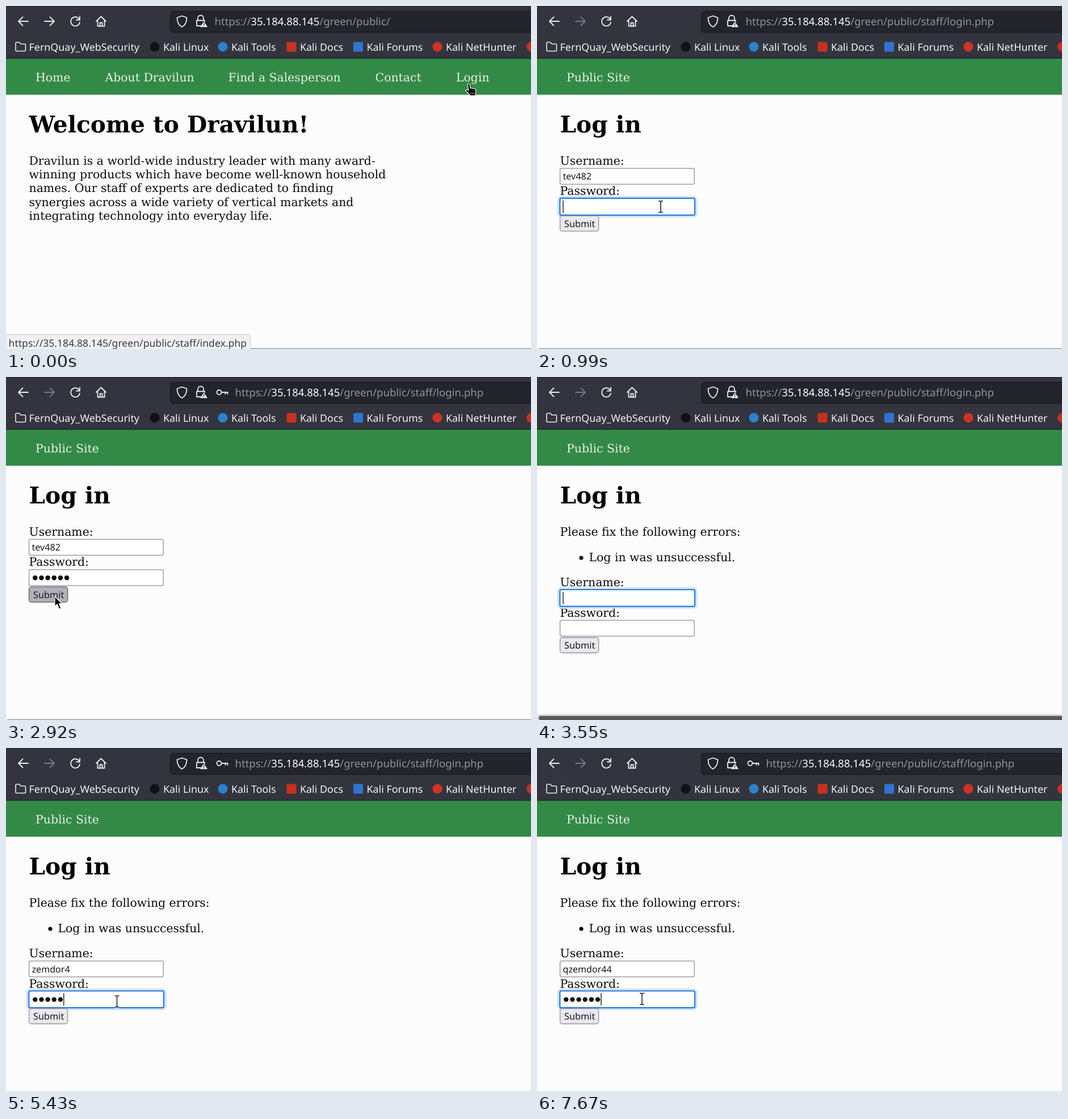
Write an HTML page that moves like this. It is 925x605 px and loops after 8000 ms.

```html
<!DOCTYPE html>
<html lang="en">
<head>
<meta charset="utf-8">
<title>Login demo</title>
<style>
  html, body { margin: 0; width: 100%; height: 100%; overflow: hidden; background: #fcfcfc; }
  svg { display: block; width: 100vw; height: 100vh; }
  text { white-space: pre; text-rendering: geometricPrecision; }
  .page { font: 20.43px "DejaVu Serif", serif; fill: #0a0a0a; }
  .title { font-size: 40.65px; font-weight: bold; fill: #000; }
  .nav { fill: #ebeee8; }
  .ui { font: 17.9px "Noto Sans", sans-serif; fill: #f4f4f8; }
  .url { font-size: 18.55px; fill: #92929a; }
  .host { fill: #fbfbfe; font-weight: 500; }
  .control { font: 16.1px "Noto Sans", sans-serif; fill: #18181c; }
  .line { fill: none; stroke: #ededf2; stroke-width: 1.8; stroke-linecap: round; stroke-linejoin: round; }
  .box { fill: #fff; stroke: #8f8f9d; stroke-width: 1.3; }
  .pointer { fill: #000; stroke: #fff; stroke-width: 1.2; stroke-linejoin: round; }
</style>
</head>
<body>
<svg viewBox="0 0 925 605" preserveAspectRatio="none">
  <rect width="925" height="605" fill="#fcfcfc"/>

  <g id="toolbar">
    <rect width="925" height="93" fill="#33343d"/>
    <rect width="925" height="1" fill="#1d1d24"/>
    <rect y="91.5" width="925" height="1.5" fill="#25262c"/>
    <rect x="289.5" y="9.5" width="660" height="37" rx="5" fill="#24242d" stroke="#19191e" stroke-width="1.3"/>
    <g class="line">
      <path d="M39 27H22M29.5 19.5L22 27L29.5 34.5"/>
      <path id="forward" d="M68 27H85M77.5 19.5L85 27L77.5 34.5"/>
      <path d="M129.5 24A8 8 0 1 0 130 29M130 18.5V24.5H124"/>
      <path d="M159 27L167.5 18.5L176 27M161.5 25.5V35.5H173.5V25.5M165.5 35V29.5H169.5V35"/>
      <path d="M310 17.5L318.5 20.5C318.5 29 315.5 34 310 37C304.5 34 301.5 29 301.5 20.5Z"/>
      <path d="M338 25V21.5A5 5 0 0 1 348 21.5V25M343 35H336V25.5H350V27"/>
      <path d="M348.5 28.5L354 36.5H343Z" fill="#ededf2" stroke-width="1.3"/>
      <path d="M348.5 31V33.4M348.5 35.2V35.3" stroke="#24242d" stroke-width="1.3"/>
      <g id="key">
        <circle cx="375.5" cy="27" r="4"/>
        <path d="M380 27H390.5V30M386.5 27V30"/>
      </g>
      <path d="M17 78V65.5Q17 64 18.5 64H23.5L26 67H33Q34.5 67 34.5 68.5V78Q34.5 79.5 33 79.5H18.5Q17 79.5 17 78Z" stroke-width="1.6"/>
    </g>
    <text id="url" class="ui url" y="33.5"><tspan>https://</tspan><tspan class="host">35.184.88.145</tspan><tspan id="path"></tspan></text>
    <g id="bookmarks" class="ui"></g>
  </g>

  <rect y="93" width="925" height="63.5" fill="#338a46"/>

  <g id="home" class="page"></g>

  <g id="login" class="page">
    <text class="nav" x="52" y="133">Public Site</text>
    <text class="title" x="40.5" y="223">Log in</text>
    <g id="errors">
      <text x="40.5" y="280">Please fix the following errors:</text>
      <circle cx="78" cy="319" r="3.6"/>
      <text x="91.5" y="324.5">Log in was unsuccessful.</text>
    </g>
    <g id="form">
      <text x="40.5" y="280">Username:</text>
      <rect class="box" x="40.6" y="286.3" width="236.6" height="28" rx="2.5"/>
      <text x="40.5" y="333.3">Password:</text>
      <rect class="box" x="40.6" y="339.8" width="236.6" height="28" rx="2.5"/>
      <g id="focus">
        <rect x="37.5" y="337" width="243" height="34" rx="5" fill="none" stroke="#cfe4fb" stroke-width="4"/>
        <rect x="40.3" y="339.2" width="237.7" height="29.6" rx="2.5" fill="#fff" stroke="#2579df" stroke-width="2.2"/>
      </g>
      <text id="user" class="control" x="45.5" y="306.3"></text>
      <g id="dots"></g>
      <rect id="caret" y="343" width="1.3" height="22"/>
      <rect id="button" x="40.6" y="370.2" width="68" height="27" rx="4" stroke-width="1.3"/>
      <text class="control" x="48" y="389.8" style="font-size:16.3px">Submit</text>
    </g>
  </g>

  <g id="wideBar">
    <rect y="594.5" width="925" height="11" fill="#dedee0"/>
    <rect x="3" y="597.8" width="940" height="7.4" rx="3.7" fill="#58585c"/>
  </g>
  <rect id="thinBar" x="2.5" y="603.7" width="925" height="1.3" fill="#929295"/>

  <g id="status">
    <path d="M-1 579.5H426Q430.5 579.5 430.5 584V606H-1Z" fill="#f1f1f3" stroke="#c9c9ce"/>
    <text class="ui" x="4.5" y="601" style="font-size:17.63px;fill:#3b3b42">https://35.184.88.145/green/public/staff/index.php</text>
  </g>

  <g id="hand" class="pointer">
    <path d="M-3.5 1.5Q-3.5 -.5 -1.8 -.5Q0 -.5 .3 1.5L1 7L8 8.5Q11.5 9.5 11 13L10 20.5H.5Q-1 17 -5 14Q-8 11.5 -6.3 10.2Q-4.5 9.2 -2.2 11.5Z"/>
    <path d="M2 15V18M5 15V18M8 15V18" stroke-width=".8"/>
  </g>
  <g id="beam">
    <path d="M-4 -10H-1.5L0 -9L1.5 -10H4M0 -9V9M-4 10H-1.5L0 9L1.5 10H4" fill="none" stroke="#fff" stroke-width="3.6"/>
    <path d="M-4 -10H-1.5L0 -9L1.5 -10H4M0 -9V9M-4 10H-1.5L0 9L1.5 10H4" fill="none" stroke="#222" stroke-width="1.6"/>
  </g>
  <path id="arrow" class="pointer" d="M0 0V17.5L4.2 13.8L7.5 22.3L10.8 20.8L7.3 12.8H12.5Z"/>
</svg>

<script>
const LOOP = 8000;
const FORM_SHIFT = 89.3, FIELD_GAP = 53.5, DOT_STEP = 11.15;
const NS = "http://www.w3.org/2000/svg";
const $ = id => document.getElementById(id);

function add(parent, tag, attrs, content = "") {
  const node = document.createElementNS(NS, tag);
  for (const name in attrs) node.setAttribute(name, attrs[name]);
  node.textContent = content;
  parent.append(node);
  return node;
}
const show = (id, on) => { $(id).style.display = on ? "" : "none"; };
const move = (id, x, y) => $(id).setAttribute("transform", `translate(${x} ${y})`);

// Bookmark labels with plain coloured marks.
[["FernQuay_WebSecurity", 40.5], ["Kali Linux", 277, "#111216"], ["Kali Tools", 397, "#2b82cf"],
 ["Kali Docs", 518, "#c7321f", true], ["Kali Forums", 635.5, "#2f74d0", true],
 ["Kali NetHunter", 775, "#cf3423"], ["", 940.5, "#c5311f"]].forEach(([label, x, color, square]) => {
  add($("bookmarks"), "text", { x, y: 78.5 }, label);
  if (color) add($("bookmarks"), "rect",
    { x: x - 23.5, y: 63.5, width: 17, height: 17, rx: square ? 1.5 : 8.5, fill: color });
});

// Public start page.
[["Home", 52], ["About Dravilun", 174.5], ["Find a Salesperson", 391.5], ["Contact", 650.5], ["Login", 793]]
  .forEach(([label, x]) => add($("home"), "text", { class: "nav", x, y: 133 }, label));
add($("home"), "text", { class: "title", x: 40.5, y: 223 }, "Welcome to Dravilun!");
["Dravilun is a world-wide industry leader with many award-",
 "winning products which have become well-known household",
 "names. Our staff of experts are dedicated to finding",
 "synergies across a wide variety of vertical markets and",
 "integrating technology into everyday life."]
  .forEach((line, i) => add($("home"), "text", { x: 40.5, y: 280 + i * 24.2 }, line));

const dots = Array.from({ length: 6 }, (_, i) =>
  add($("dots"), "circle", { cx: 51.3 + i * DOT_STEP, cy: 354.3, r: 4.2 }));

// Each step changes part of the state from its time (ms) on.
const steps = [
  [0, { page: "home", user: "", dots: 0, focus: "", bar: "thin", pointer: ["hand", 817, 137.5] }],
  [120, { page: "login", focus: "user", pointer: null }],
  [500, { user: "te", bar: "wide" }],
  [620, { user: "tev48" }],
  [990, { user: "tev482", focus: "pass", bar: "thin", pointer: ["beam", 218, 354] }],
  [1870, { dots: 1, bar: "" }],
  [2130, { dots: 4 }],
  [2260, { dots: 6 }],
  [2780, { bar: "thin", pointer: ["arrow", 86, 387] }],
  [2920, { focus: "", pressed: true }],
  [3040, { page: "error", user: "", dots: 0, pressed: false }],
  [3180, { focus: "user", bar: "wide" }],
  [3430, { pointer: null }],
  [3790, { user: "ze", bar: "thin" }],
  [3915, { user: "zemd" }],
  [4040, { user: "zemdor4", bar: "" }],
  [4680, { focus: "pass", pointer: ["beam", 195.5, 447] }],
  [4780, { dots: 1 }],
  [5060, { dots: 3 }],
  [5430, { dots: 5 }],
  [5680, { dots: 6 }],
  [5805, { bar: "thin", pointer: ["arrow", 90, 473] }],
  [5930, { focus: "", pressed: true }],
  [6055, { user: "", dots: 0, pressed: false }],
  [6180, { bar: "wide" }],
  [6305, { pointer: null }],
  [6680, { user: "q", focus: "user", bar: "thin" }],
  [6800, { user: "qze" }],
  [7050, { user: "qzemd", bar: "" }],
  [7170, { user: "qzemdor44" }],
  [7310, { focus: "pass", dots: 1, bar: "thin", pointer: ["beam", 185, 442.5] }],
  [7440, { dots: 3, bar: "" }],
  [7670, { dots: 6 }]
];
let last = {};
const states = steps.map(([time, change]) => (last = { ...last, ...change, time }));

function render(s) {
  const home = s.page === "home", error = s.page === "error";
  show("home", home);
  show("status", home);
  show("login", !home);
  show("errors", error);
  move("form", 0, error ? FORM_SHIFT : 0);

  $("forward").style.stroke = home ? "" : "#797a82";
  $("path").textContent = "/green/public/" + (home ? "" : "staff/login.php");
  $("url").setAttribute("x", s.dots ? 403.5 : 367.5);
  show("key", s.dots);

  $("user").textContent = s.user;
  dots.forEach((dot, i) => { dot.style.display = i < s.dots ? "" : "none"; });
  const inUser = s.focus === "user";
  show("focus", s.focus);
  show("caret", s.focus);
  move("focus", 0, inUser ? -FIELD_GAP : 0);
  move("caret", 0, inUser ? -FIELD_GAP : 0);
  const userWidth = s.user ? $("user").getComputedTextLength() : 0;
  $("caret").setAttribute("x", 45.4 + (inUser ? userWidth : s.dots * DOT_STEP));
  $("button").style.fill = s.pressed ? "#b1b1b9" : "#e9e9ed";
  $("button").style.stroke = s.pressed ? "#5b5b66" : "#8f8f9d";

  show("wideBar", s.bar === "wide");
  show("thinBar", s.bar === "thin");
  const [shape, x, y] = s.pointer || [];
  for (const id of ["hand", "beam", "arrow"]) show(id, id === shape);
  if (shape) move(shape, x, y);
}

const start = performance.now();
let shown;
function tick() {
  const time = (performance.now() - start) % LOOP;
  const state = states.findLast(s => s.time <= time);
  if (state !== shown) render(shown = state);
  requestAnimationFrame(tick);
}
tick();
</script>
</body>
</html>
```
